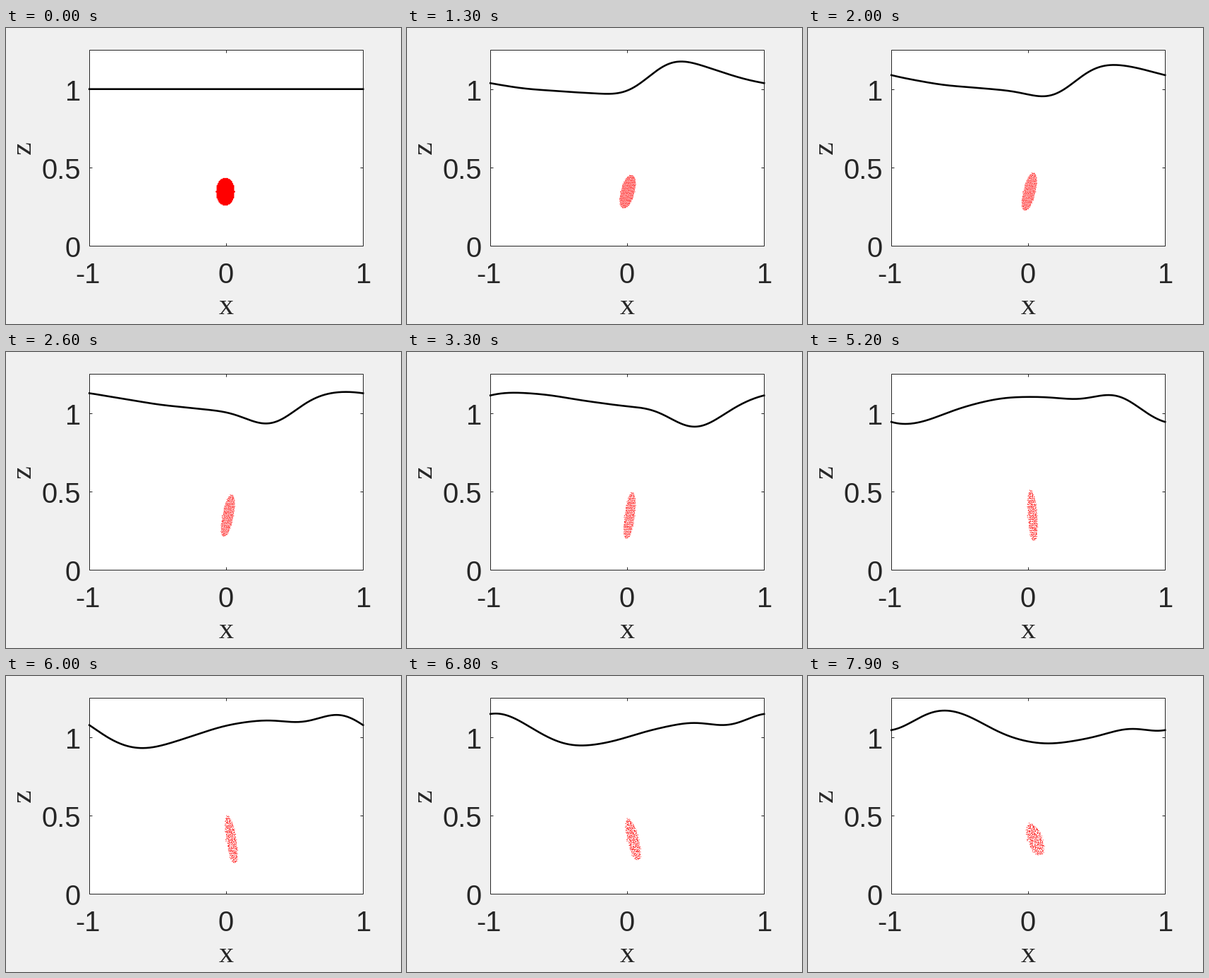
Recreate the animation shown at these times as a matplotlib script. Size 560 by 420 pixels, loop 8000 ms.

```python
import numpy as np
import matplotlib.pyplot as plt
from matplotlib.animation import FuncAnimation
from matplotlib.patches import Rectangle

W, H, DPI = 560, 420, 100
PX = 72 / DPI                     # points per pixel
FRAMES, STEP = 80, 100
INK = "#262626"
LEFT, RIGHT, TOP, BOTTOM = 118.2, 506.2, 31.2, 309.2
MID = (LEFT + RIGHT) / 2
REST = 86.7                       # height of the surface at rest

fig = plt.figure(figsize=(W / DPI, H / DPI), dpi=DPI, facecolor="#f0f0f0")
ax = fig.add_axes([0, 0, 1, 1])
ax.set(xlim=(0, W), ylim=(H, 0))
ax.axis("off")


def label(x, y, s, font="Liberation Sans", size=40, ha="center", rot=0):
    ax.text(x, y, s, family=font, size=size * PX, color=INK, ha=ha,
            va="baseline", rotation=rot, rotation_mode="anchor")


def tick(xs, ys):
    ax.plot(xs, ys, color=INK, lw=PX, solid_capstyle="butt", zorder=4)


ax.add_patch(Rectangle((LEFT, TOP), RIGHT - LEFT, BOTTOM - TOP,
                       fc="white", ec=INK, lw=PX, zorder=1))
for y, s in ((86.8, "1"), (198.2, "0.5"), (309.2, "0")):
    label(106, y + 16, s, ha="right")
    if y < BOTTOM:
        tick([LEFT, LEFT + 4], [y, y])
        tick([RIGHT - 4, RIGHT], [y, y])
for x, s in ((116.5, "-1"), (312, "0"), (507.5, "1")):
    label(x, 362, s)
tick([MID, MID], [TOP, TOP + 4])
tick([MID, MID], [BOTTOM - 4, BOTTOM])
label(312, 406, "x", "Liberation Serif", 42)
label(35, 170, "z", "Liberation Serif", 42, rot=90)

# Surface: dispersive cosine modes released from a hump at x = 0
theta = np.linspace(-np.pi, np.pi, 400)
MEAN = 10.7
AMPS = (18.4, 7.9, 3.0, 0.95, 0.35)
BACK = -1.4                       # weak first mode running left


def omega(n):
    return np.radians(74.6) * np.sqrt(n * np.tanh(1.26 * n) / np.tanh(1.26))


def surface(t):
    eta = MEAN + BACK * np.cos(theta + omega(1) * t)
    for n, a in enumerate(AMPS, 1):
        eta = eta + a * np.cos(n * theta - omega(n) * t)
    return REST - eta


# Tracer patch: a grid in a unit disc, stretched and sheared over time
A0, B0 = 12.6, 19.2
GRID = 1.4
rng = np.random.default_rng(4)
gx, gy = np.meshgrid(np.arange(-9, 10) * GRID / A0,
                     np.arange(-14, 15) * GRID / B0)
inside = gx ** 2 + gy ** 2 <= 1
u, v = gx[inside], gy[inside]
drift = rng.normal(0, 1, (2, u.size))

half = np.polyfit([0, 0.9, 1.8, 2.7, 3.6, 4.5, 5.4, 6.3, 7.2, 7.9],
                  [19.2, 22.4, 26.3, 30.8, 34.8, 37, 36.4, 33, 27.5, 22.8], 5)
lean = np.polyfit([0, 1.3, 2.6, 4.1, 5.2, 6.8, 7.9],
                  [0, 5.6, 5, 1.9, -2.3, -7, -6.3], 4)


def patch(t):
    h, s = np.polyval(half, t), np.polyval(lean, t)
    jx, jy = drift * 0.09 * t
    x = 311 + 1.4 * t + A0 * B0 / h * u + s * v + jx
    y = 232.3 - h * v + jy
    return np.column_stack([x, y])


# One size per dot keeps the dots at sub-pixel positions
dots = ax.scatter(u, v, s=np.ones(u.size), color="red", lw=0, zorder=3)
wave, = ax.plot([], [], color="black", lw=2.6 * PX, zorder=5,
                solid_capstyle="projecting", clip_on=False, snap=False)


def draw(i):
    t = i * STEP / 1000
    y = surface(t) if i else np.full_like(theta, REST)
    wave.set_data(MID + theta / np.pi * (RIGHT - MID), y)
    dots.set_offsets(patch(t))
    size = 1.22 - 0.02 * t if i else 2.6
    dots.set_sizes(np.full(u.size, (size * PX) ** 2))
    return dots, wave


anim = FuncAnimation(fig, draw, frames=FRAMES, interval=STEP,
                     repeat=True, repeat_delay=0, blit=False)
plt.show()
```
